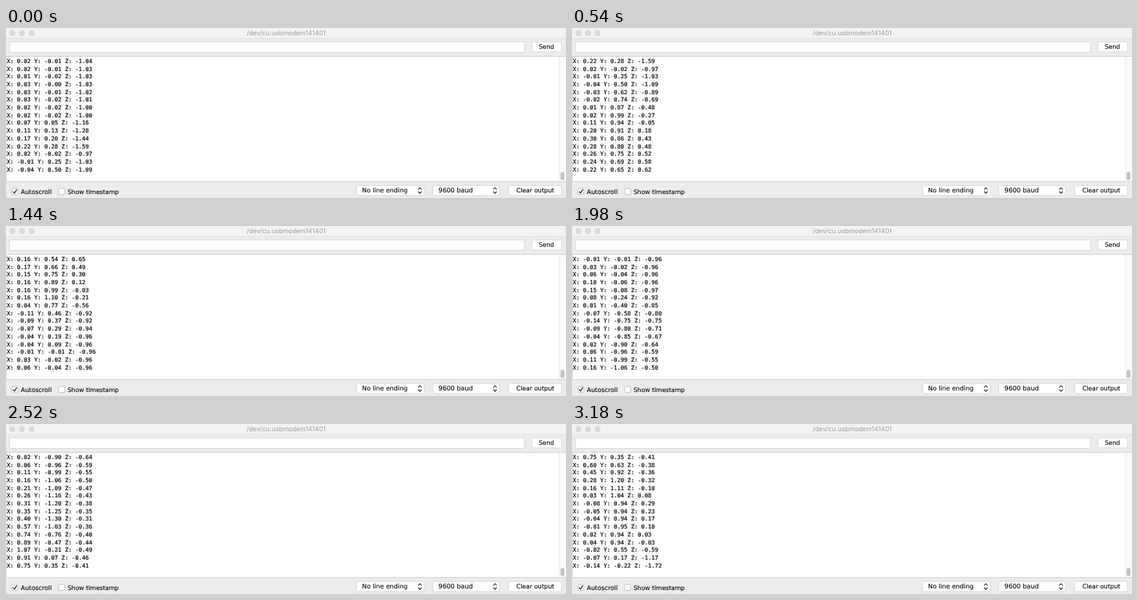
Recreate the animation shown at these times as an HTML page. Size 700 px wide and 213 px high, loop 3240 ms.

```html
<!DOCTYPE html>
<html lang="en">
<head>
<meta charset="utf-8">
<title>Serial monitor</title>
<style>
  html, body { margin: 0; width: 100%; height: 100%; overflow: hidden; background: #ececec; }
  svg { display: block; width: 700px; height: 213px; }
  text { font: 7.6px "DejaVu Sans", sans-serif; fill: #000; stroke: #000; stroke-width: .08; text-rendering: geometricPrecision; }
  .title { font: 8.1px Inter, sans-serif; fill: #9c9c9c; stroke: none; }
  .title, .mid { text-anchor: middle; }
  #log text { font: 7.12px "DejaVu Sans Mono", monospace; stroke-width: .18; }
  .control { fill: #fff; stroke: #d2d2d2; stroke-width: .7; }
  .box { fill: #fff; stroke: #b4b4b4; stroke-width: .7; }
  .mark { fill: none; stroke: #222; stroke-width: 1.05; stroke-linecap: round; stroke-linejoin: round; }
</style>
</head>
<body>
<svg viewBox="0 0 700 213">
  <rect width="700" height="213" fill="#ececec"/>
  <rect width="700" height="13" fill="#f3f3f3"/>
  <path d="M0 13.2H700" stroke="#dadada" stroke-width=".6"/>
  <g fill="#dadada" stroke="#cfcfcf" stroke-width=".4">
    <circle cx="8" cy="6.4" r="3.4"/>
    <circle cx="20" cy="6.4" r="3.4"/>
    <circle cx="32" cy="6.4" r="3.4"/>
  </g>
  <text class="title" x="350.2" y="9.3">/dev/cu.usbmodem141401</text>

  <rect class="control" x="4.3" y="17.3" width="643.7" height="13.2"/>
  <rect class="control" x="657.3" y="17.3" width="37.2" height="12.6" rx="2.6"/>
  <text class="mid" x="675.6" y="26.3">Send</text>

  <rect y="35.5" width="700" height="156.8" fill="#fff"/>
  <path d="M0 35.5H700M0 192.4H700M.3 36V192" stroke="#c4c4c4" stroke-width=".7"/>
  <rect x="691.5" y="36" width="8.5" height="156" fill="#fafafa"/>
  <path d="M691.5 36V192" stroke="#e8e8e8" stroke-width=".7"/>
  <rect x="693.2" y="180.3" width="4.8" height="10.5" rx="2.4" fill="#c1c1c1"/>
  <g id="log"></g>

  <rect class="box" x="7.2" y="201" width="7.6" height="7.6" rx="1.3"/>
  <path class="mark" d="M9 205.1l1.6 1.8l2.7 -4.3"/>
  <text x="18.6" y="207.5" style="font-size:7.8px">Autoscroll</text>
  <rect class="box" x="65.8" y="201" width="7.6" height="7.6" rx="1.3"/>
  <text x="77" y="207.5">Show timestamp</text>

  <rect class="control" x="438.3" y="197.3" width="84.6" height="12.6" rx="2.6"/>
  <text x="445" y="206.3" style="font-size:7.9px">No line ending</text>
  <path class="mark" d="M515.4 202l1.9 -2l1.9 2M515.4 205.2l1.9 2l1.9 -2"/>
  <rect class="control" x="533.3" y="197.3" width="83.6" height="12.6" rx="2.6"/>
  <text x="540.6" y="206.3" style="font-size:8px">9600 baud</text>
  <path class="mark" d="M609.4 202l1.9 -2l1.9 2M609.4 205.2l1.9 2l1.9 -2"/>
  <rect class="control" x="628.3" y="197.3" width="66.2" height="12.6" rx="2.6"/>
  <text class="mid" x="661.6" y="206.3">Clear output</text>
</svg>
<script>
const LOOP = 3240, TICK = 60, ROWS = 15, JITTER = 0.015;
const LINES_PER_TICK = 1.266, LEAD = 0.3;

// Poses the board is moved through: at this line, acceleration on x, y, z.
const poses = [
  { line: 0, axes: [0.02, -0.01, -1.04] },
  { line: 7, axes: [0.02, -0.02, -1] },
  { line: 11, axes: [0.22, 0.28, -1.59] },
  { line: 12, axes: [0.02, -0.02, -0.97] },
  { line: 14, axes: [-0.04, 0.5, -1.09] },
  { line: 18, axes: [0.02, 0.99, -0.27] },
  { line: 21, axes: [0.3, 0.86, 0.43] },
  { line: 29, axes: [0.17, 0.43, 0.82] },
  { line: 35, axes: [0.16, 1.1, -0.21] },
  { line: 37, axes: [-0.11, 0.46, -0.92] },
  { line: 42, axes: [-0.01, -0.01, -0.96] },
  { line: 46, axes: [0.15, -0.08, -0.97] },
  { line: 50, axes: [-0.14, -0.75, -0.75] },
  { line: 61, axes: [0.4, -1.3, -0.31] },
  { line: 65, axes: [1.07, -0.21, -0.49] },
  { line: 70, axes: [0.28, 1.2, -0.32] },
  { line: 73, axes: [-0.08, 0.94, 0.29] },
  { line: 78, axes: [0.04, 0.94, -0.03] },
  { line: 81, axes: [-0.14, -0.22, -1.72] }
];

// Repeatable noise from -1 to 1.
function noise(seed) {
  const n = Math.sin(seed * 12.9898) * 43758.5453;
  return 2 * (n - Math.floor(n)) - 1;
}

// Blend between neighbouring poses, with sensor jitter on the way.
function reading(line) {
  const next = Math.max(1, poses.findIndex(pose => pose.line >= line));
  const from = poses[next - 1], to = poses[next];
  const u = (line - from.line) / (to.line - from.line);
  return 'XYZ'.split('').map((name, k) => {
    const jitter = JITTER * Math.sin(Math.PI * u) * noise(line * 3 + k + 1);
    const value = from.axes[k] + (to.axes[k] - from.axes[k]) * u + jitter;
    return `${name}: ${value.toFixed(2)}`;
  }).join(' ');
}

const log = document.getElementById('log');
const rows = Array.from({ length: ROWS }, (_, i) => {
  const row = document.createElementNS('http://www.w3.org/2000/svg', 'text');
  row.setAttribute('x', 0.9);
  row.setAttribute('y', 43.8 + i * 9.71);
  return log.appendChild(row);
});

function draw(time) {
  const tick = Math.floor((time % LOOP) / TICK);
  const first = Math.floor(tick * LINES_PER_TICK + LEAD);
  rows.forEach((row, i) => { row.textContent = reading(first + i); });
}

const start = performance.now();
function animate() {
  draw(performance.now() - start);
  requestAnimationFrame(animate);
}
animate();
</script>
</body>
</html>
```
